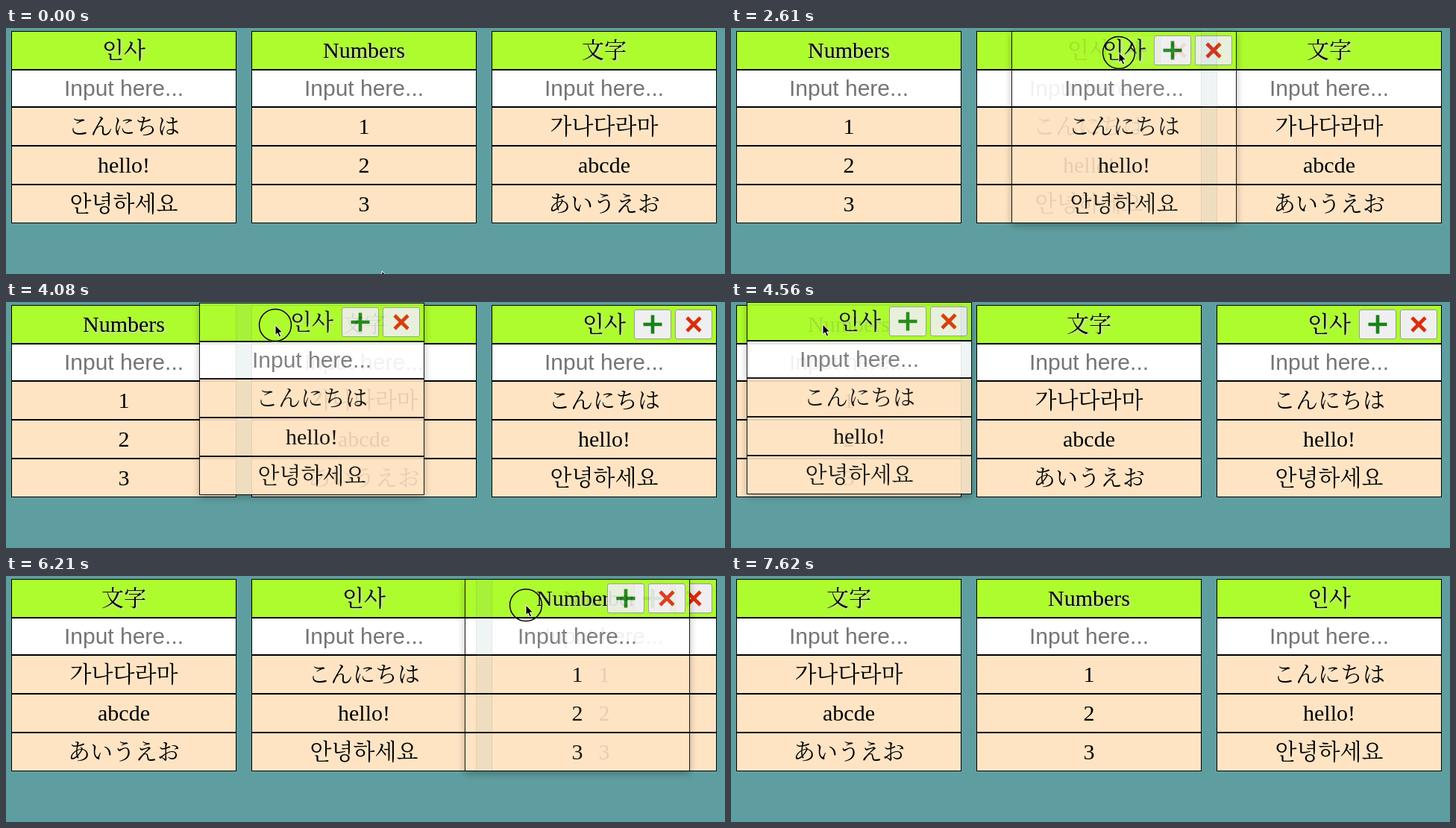
Recreate the animation shown at these times as an HTML page. Size 964 px wide and 330 px high, loop 8.34 s.

```html
<!DOCTYPE html>
<html lang="ko">
<head>
<meta charset="utf-8">
<title>Draggable columns</title>
<style>
html, body { margin: 0; width: 100%; height: 100%; overflow: hidden; }
#stage {
  position: absolute; left: 0; top: 0; width: 964px; height: 330px;
  overflow: hidden; background: #5f9ea0;
}
.col { position: absolute; left: 0; top: 0; width: 302px; height: 258px; }
.cell {
  box-sizing: border-box; height: 52px; border: 1px solid #000;
  background: #ffe4c4; color: #000; text-align: center; white-space: nowrap;
  font: 30px/50px "Liberation Serif", "Noto Serif CJK KR", "Noto Sans CJK KR", serif;
}
.cell:lang(ja) {
  font-family: "Liberation Serif", "Noto Serif CJK JP", "Noto Sans CJK JP", serif;
}
.thin { font-weight: 300; }
.head { background: #adfc2d; text-shadow: 2px 2px 3px #d3d3d3; }
.input {
  height: 50px; line-height: 48px; background: #fff; color: #757575;
  font-family: "Liberation Sans", Arial, sans-serif;
}
.btn {
  position: absolute; top: 6px; box-sizing: border-box; width: 50px; height: 40px;
  border: 1px solid #999; border-radius: 3px; background: #efefef; visibility: hidden;
}
.hot .btn { visibility: visible; }
.add { left: 191px; }
.del { left: 246px; }
.btn svg { position: absolute; left: 0; top: 0; }
.ghost { opacity: .9; box-shadow: 0 3px 10px rgba(0, 0, 0, .3); display: none; }
#pointer { position: absolute; left: 0; top: 0; overflow: visible; }
</style>
</head>
<body>
<div id="stage">
  <svg id="pointer" width="1" height="1">
    <g id="ring" fill="none">
      <circle r="22.5" stroke="#fff" stroke-opacity=".5" stroke-width="1"/>
      <circle r="21.5" stroke="#000" stroke-width="1.5"/>
    </g>
    <path id="arrow" d="M0 0V13.5L3 10.8L5.2 16L7.7 15L5.5 9.9H9.7Z"
      fill="#000" stroke="#fff" stroke-width="1"/>
    <g id="hand" stroke="#000" stroke-width="1" stroke-linejoin="round">
      <path fill="#fff" d="M-1.3 .8Q0 -1 1.3 .8L2.2 5Q3.6 4 4.6 5.2Q6 4.4 7 5.7Q8.7 5 9.3 6.8
        Q10.4 10.5 8.6 12.6V15H1.6V13.5L-2.8 9Q-3.6 7.4 -1.8 7.4L.4 8.8Z"/>
      <path fill="none" stroke-width=".7" d="M3.2 9.5V12.8M5.2 9.5V12.8M7.2 9.5V12.8"/>
    </g>
  </svg>
</div>
<script>
const LOOP = 8340, STEP = 30, TOP = 4;
const SLOTS = [7, 329, 651];
const stage = document.getElementById('stage');
const pointer = document.getElementById('pointer');
const [ring, arrow, hand] = ['ring', 'arrow', 'hand'].map(id => document.getElementById(id));

const COLUMNS = [
  ['인사', 'こんにちは', 'hello!', '안녕하세요'],
  ['Numbers', '1', '2', '3'],
  ['文字', '가나다라마', 'abcde', 'あいうえお'],
];

// Pointer path: time, x, y
const PATH = [
  [0, 504, 326], [300, 480, 160], [600, 440, 45], [780, 436, 33], [960, 436, 33],
  [1230, 347, 34], [1530, 180, 34], [1620, 173, 34], [1710, 165, 36],
  [1950, 420, 180], [2130, 810, 228], [2370, 520, 60], [2490, 473, 33], [2550, 473, 33],
  [2610, 520, 33], [3000, 750, 40], [3180, 789, 43], [3420, 789, 43],
  [3600, 753, 34], [3720, 753, 34], [4230, 211, 30], [4500, 124, 30], [4560, 123, 30],
  [4800, 123, 33], [5160, 123, 33], [5280, 168, 34], [5600, 460, 37],
  [5850, 733, 39], [6150, 733, 39], [6210, 697, 39], [6480, 386, 41], [6540, 380, 41],
  [6700, 380, 41], [7100, 480, 160], [7470, 603, 317], [7530, 603, 317], [7620, 645, 332],
];

// idle: when the hover state refreshes after the drop
const DRAGS = [
  { press: 870, start: 1000, drop: 1620, idle: 1700, from: 1, to: 0 },
  { press: 2490, start: 2600, drop: 3210, idle: 3420, from: 1, to: 2 },
  { press: 3690, start: 3780, drop: 4590, idle: 4650, from: 2, to: 0 },
  { press: 5100, start: 5220, drop: 5610, idle: 5670, from: 0, to: 1 },
  { press: 6060, start: 6200, drop: 6690, idle: 6780, from: 2, to: 1 },
];

function add(parent, cls, text) {
  const el = document.createElement('div');
  el.className = cls;
  if (text) el.textContent = text;
  parent.appendChild(el);
  return el;
}

function icon(d, color) {
  return `<svg width="48" height="38"><path d="${d}" stroke="${color}" stroke-width="4.6"/></svg>`;
}

function cell(col, text, cls) {
  const el = add(col, 'cell ' + cls, text);
  if (/[ぁ-ん一-龥]/.test(text)) el.lang = 'ja';
  if (text !== 'あいうえお') el.classList.add('thin');
}

function makeColumn([title, ...rows], cls) {
  const col = add(stage, 'col ' + cls);
  cell(col, title, 'head');
  add(col, 'cell input', 'Input here...');
  rows.forEach(row => cell(col, row, ''));
  add(col, 'btn add').innerHTML = icon('M11.5 19H36.5M24 6.5V31.5', '#1a801a');
  add(col, 'btn del').innerHTML = icon('M15 10L33 28M33 10L15 28', '#dc2b0b');
  return col;
}

const cols = COLUMNS.map(c => makeColumn(c, ''));
const ghosts = COLUMNS.map(c => makeColumn(c, 'ghost hot'));
stage.appendChild(pointer);

const place = (el, x, y) => { el.style.transform = `translate(${x}px, ${y}px)`; };
const show = (el, on) => { el.style.display = on ? '' : 'none'; };

// Monotone cubic through the path points
function slope(i, k) {
  if (i < 1 || i >= PATH.length - 1) return 0;
  const [a, b, c] = [PATH[i - 1], PATH[i], PATH[i + 1]];
  const l = (b[k] - a[k]) / (b[0] - a[0]), r = (c[k] - b[k]) / (c[0] - b[0]);
  return l * r > 0 ? 2 * l * r / (l + r) : 0;
}

function pointAt(t) {
  let i = 0;
  while (i < PATH.length - 2 && PATH[i + 1][0] <= t) i++;
  const a = PATH[i], b = PATH[i + 1], d = b[0] - a[0];
  const u = Math.min(1, (t - a[0]) / d), v = 1 - u;
  return [1, 2].map(k => Math.round(
    a[k] * v * v * (1 + 2 * u) + b[k] * u * u * (1 + 2 * v) +
    d * u * v * (v * slope(i, k) - u * slope(i + 1, k))));
}

function draw(t) {
  const [x, y] = pointAt(t);
  const order = [0, 1, 2];
  const over = y >= TOP && y < TOP + 52
    ? SLOTS.findIndex(s => x >= s && x < s + 302) : -1;
  let hover = over, held = false, dragged = -1;

  for (const d of DRAGS) {
    if (t >= d.press && t < d.idle) hover = d.from;
    if (t >= d.press && t < d.drop - 45) held = true;
    if (t >= d.start && t < d.drop) {
      dragged = order[d.from];
      const [gx, gy] = pointAt(d.press);
      place(ghosts[dragged], SLOTS[d.from] + x - gx, TOP + y - gy);
    }
    if (t >= d.drop) [order[d.from], order[d.to]] = [order[d.to], order[d.from]];
  }

  order.forEach((c, slot) => {
    place(cols[c], SLOTS[slot], TOP);
    cols[c].classList.toggle('hot', slot === hover);
  });
  ghosts.forEach((g, i) => { g.style.display = i === dragged ? 'block' : 'none'; });

  const pointing = over >= 0 && dragged < 0;
  place(pointer, x, y);
  show(pointer, t < 7620);
  show(ring, held);
  show(hand, pointing);
  show(arrow, !pointing);
}

const begin = performance.now();
function tick() {
  const t = (performance.now() - begin) % LOOP;
  draw(Math.floor(t / STEP) * STEP);
  requestAnimationFrame(tick);
}
tick();
</script>
</body>
</html>
```
